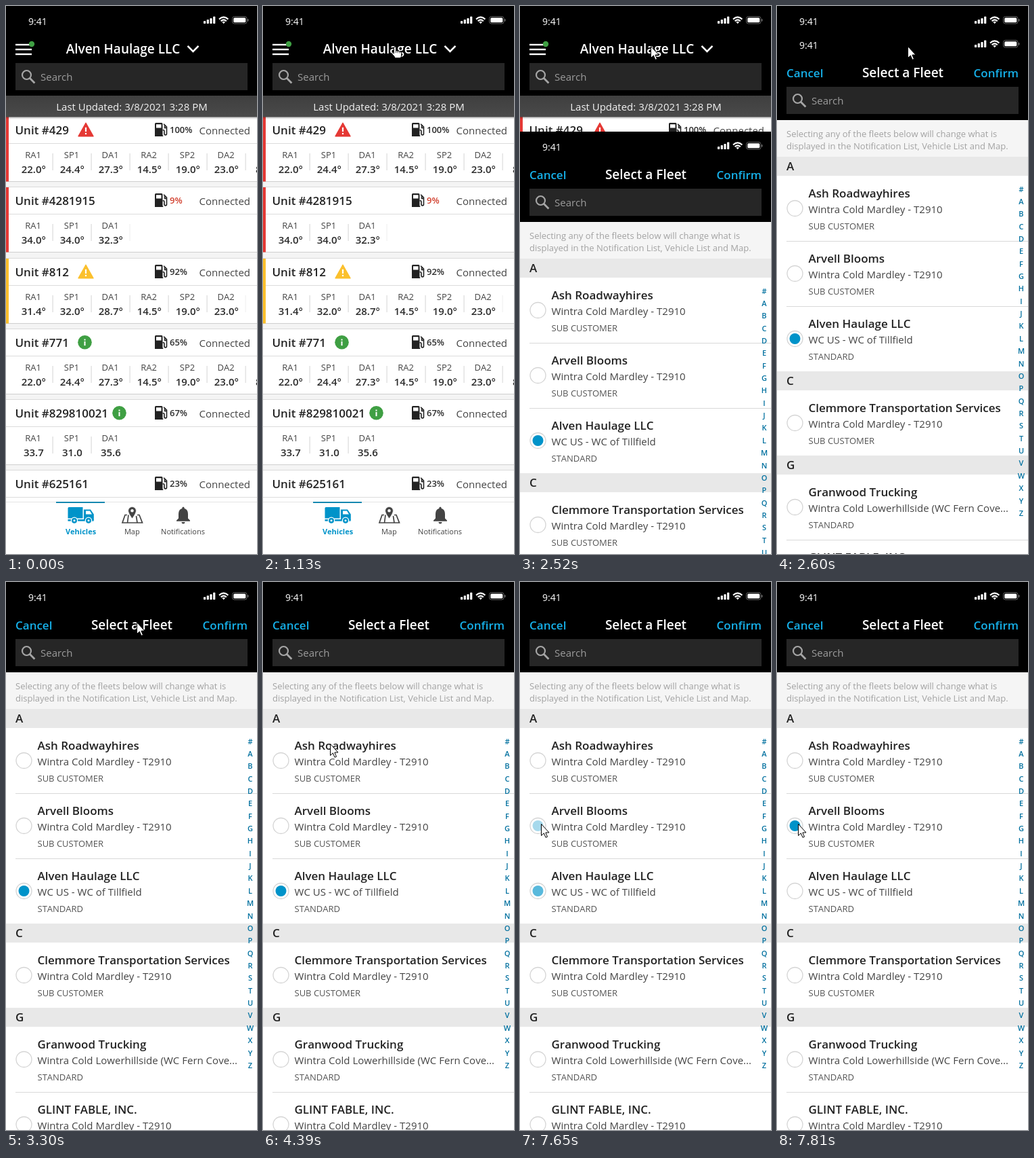
Recreate the animation shown at these times as an HTML page. Size 371x807 px, loop 8000 ms.

```html
<!DOCTYPE html>
<html lang="en">
<head>
<meta charset="utf-8">
<title>Fleet selection</title>
<style>
  html, body { margin: 0; width: 100%; height: 100%; overflow: hidden; background: #fff; }
  svg { display: block; width: 371px; height: 807px; font-family: "Open Sans", sans-serif; font-kerning: none; }
</style>
</head>
<body>
<svg id="stage" viewBox="0 0 371 807" xmlns="http://www.w3.org/2000/svg"></svg>
<script>
const LOOP = 8000;
const BLUE = '#0093c9', LINK = '#16b1ea', RED = '#e53935', AMBER = '#fbc02d', GREEN = '#3f9f43';

const text = (x, y, str, size, fill, weight = 400, anchor = 'start') =>
  `<text x="${x}" y="${y}" font-size="${size}" fill="${fill}" font-weight="${weight}" text-anchor="${anchor}">${str}</text>`;
const rect = (x, y, w, h, fill, rx = 0) =>
  `<rect x="${x}" y="${y}" width="${w}" height="${h}" fill="${fill}" rx="${rx}"/>`;
const path = (d, fill, extra = '') => `<path d="${d}" fill="${fill}" ${extra}/>`;
const line = (d, color, width, extra = '') =>
  path(d, 'none', `stroke="${color}" stroke-width="${width}" ${extra}`);
const circle = (x, y, r, fill, extra = '') =>
  `<circle cx="${x}" cy="${y}" r="${r}" fill="${fill}" ${extra}/>`;
const group = (x, y, body, attrs = '') => `<g transform="translate(${x} ${y})" ${attrs}>${body}</g>`;

// Black header shared by both screens: status icons and search field
function header() {
  const bars = [4, 6, 8, 10.5].map((h, i) => rect(292 + i * 4.7, 26 - h, 3.2, h, '#fff', .8)).join('');
  const wifi = line('M315 19.5Q321.7 13.2 328.4 19.5M317.6 22.2Q321.7 18.4 325.8 22.2', '#fff', 2.1) +
    path('M319.4 23.6Q321.7 21.8 324 23.6L321.7 26.2Z', '#fff');
  const battery = `<rect x="334.5" y="15.5" width="21.5" height="10.5" rx="3" fill="none" stroke="#646464"/>` +
    rect(336.3, 17.2, 18, 7.1, '#fff', 1.6) + rect(357, 19, 1.4, 3.6, '#707070', .7);
  return rect(0, 0, 371, 133, '#000') + text(33, 28, '9:41', 14, '#fff') + bars + wifi + battery +
    rect(14, 84, 343, 40, '#262626') +
    circle(30.5, 101.5, 6.5, 'none', 'stroke="#a6a6a6" stroke-width="2.2"') +
    line('M35.2 106.2L42.4 113.4', '#a6a6a6', 2.8) + text(51, 110, 'Search', 15, '#9c9c9c');
}

const warning = color =>
  path('M0 -10L11 9.5H-11Z', color, `stroke="${color}" stroke-width="1.4" stroke-linejoin="round"`) +
  rect(-1.1, -3.5, 2.2, 6.3, '#fff') + rect(-1.1, 4.6, 2.2, 2.2, '#fff');
const info = circle(0, 0, 10.3, GREEN) + rect(-1, -1.4, 2, 6.2, '#fff') + rect(-1, -4.8, 2, 2, '#fff');
const fuel = path('M1.5 0H10Q11.5 0 11.5 1.5V18.4H12.3V20H0V1.5Q0 0 1.5 0ZM2 2.3V7.6H9.5V2.3Z', '#222', 'fill-rule="evenodd"') +
  line('M11.5 10.8H12.8Q14 10.8 14 12.3V16Q14 17.9 15.8 17.9Q17.5 17.9 17.5 16V6L13.2 1.8M14.6 3.4V7.4H17.5', '#222', 1.6);

const SENSORS = ['RA1', 'SP1', 'DA1', 'RA2', 'SP2', 'DA2', ''];
const LONG = '22.0° 24.4° 27.3° 14.5° 19.0° 23.0° 8.0°';
const UNITS = [
  { id: 429, bar: RED, icon: warning(RED), at: 118, fuel: 100, values: LONG },
  { id: 4281915, bar: RED, fuel: 9, values: '34.0° 34.0° 32.3°', faintEnd: true },
  { id: 812, bar: AMBER, icon: warning(AMBER), at: 118, fuel: 92, values: '31.4° 32.0° 28.7° 14.5° 19.0° 23.0°', faintEnd: true },
  { id: 771, icon: info, at: 116.5, fuel: 65, values: LONG },
  { id: 829810021, icon: info, at: 167.5, fuel: 67, values: '33.7 31.0 35.6' },
  { id: 625161, fuel: 23, values: '' }
];

function unitCard(unit, i) {
  const values = unit.values.split(' ');
  const cells = values.map((value, c) => {
    const x = 40 + c * 57, last = c === values.length - 1;
    const rule = last ? (unit.faintEnd ? '#f1f1f1' : 'none') : '#dcdcdc';
    const label = value ? SENSORS[c] : '';
    return text(x, 224, label, 13, '#444', 400, 'middle') +
      text(x + .8, 246, value, 15, '#2b2b2b', 600, 'middle') + rect(x + 28.5, 217, 1.2, 25, rule);
  }).join('');
  return group(0, Math.round(104.25 * i),
    rect(0, 162.5, 371, 96, '#fff') + rect(0, 162, 371, 1, '#dadada') + rect(0, 258, 371, 1, '#cfcfcf') +
    rect(0, 202, 371, 1, '#dcdcdc') + (unit.bar ? rect(0, 163, 4, 95.5, unit.bar) : '') +
    text(13.5, 189, 'Unit #' + unit.id, 17, '#222', 600) +
    (unit.icon ? group(unit.at, 182.3, unit.icon) : '') + group(220, 172, fuel) +
    text(242, 187, unit.fuel + '%', 13, unit.fuel < 10 ? '#d13f2d' : '#2b2b2b', 600) +
    text(361, 189, 'Connected', 15, '#444', 400, 'end') + cells);
}

function navBar() {
  const truck = path('M93 738H113.5V754.5H91.5V739.5Q91.5 738 93 738ZM115 741.5H125L129.8 748.5V757.5H115Z', BLUE) +
    path('M118 743.5H124L127 748.5H118Z', '#fff') + rect(91.5, 756, 38, 2.6, BLUE) +
    [101, 122].map(x => circle(x, 757.8, 4.6, BLUE, 'stroke="#fff" stroke-width="1.3"') + circle(x, 757.8, 1.5, '#fff')).join('');
  const map = line('M179 749.5H176L172 761H201.5L197 749.5H194M181 749.5L179.5 761M192.5 751L194 761', '#444', 1.7) +
    path('M186.5 737.5C190 737.5 192.4 740 192.4 743.3C192.4 747.5 186.5 754.8 186.5 754.8S180.6 747.5 180.6 743.3C180.6 740 183 737.5 186.5 737.5Z', '#444', 'stroke="#fff" stroke-width=".8"') +
    circle(186.5, 743.2, 2.2, '#fff');
  const bell = path('M262 737.5Q263.8 737.5 263.8 740Q269 741.6 269 748V754.5L272 757.5V758.8H252V757.5L255 754.5V748Q255 741.6 260.2 740Q260.2 737.5 262 737.5ZM259.3 760H264.7Q264.2 762.5 262 762.5T259.3 760Z', '#444');
  return rect(0, 730, 371, 77, '#fff') + rect(0, 730, 371, 1, '#e4e4e4') + rect(74, 730, 72, 2, '#1788b0') +
    truck + map + bell + text(110.5, 778, 'Vehicles', 11, BLUE, 700, 'middle') +
    text(186.3, 778, 'Map', 11, '#444', 400, 'middle') + text(261.5, 778, 'Notifications', 11, '#444', 400, 'middle');
}

function vehicleScreen() {
  const menu = [55.8, 62.8, 69.8].map(y => rect(14, y, 24, 2.4, '#fff')).join('');
  return rect(0, 0, 371, 807, '#f4f4f4') + UNITS.map(unitCard).join('') + rect(0, 163, 371, 4, 'url(#shade)') +
    header() + rect(0, 132, 371, 31.5, 'url(#strip)') +
    text(186, 154, 'Last Updated: 3/8/2021 3:28 PM', 15, '#f2f2f2', 400, 'middle') +
    menu + circle(38, 56, 4.2, GREEN) +
    text(173, 70, 'Alven Haulage LLC', 19, '#fff', 600, 'middle') +
    line('M268.5 58.8L276.5 66.8L284.5 58.8', '#fff', 2.6) + navBar();
}

const DEALER = 'Wintra Cold Mardley - T2910';
const FLEETS = [
  { top: 215, name: 'Ash Roadwayhires', dealer: DEALER, kind: 'SUB CUSTOMER', section: 'A' },
  { top: 311, name: 'Arvell Blooms', dealer: DEALER, kind: 'SUB CUSTOMER', dot: 'newDot' },
  { top: 407, name: 'Alven Haulage LLC', dealer: 'WC US - WC of Tillfield', kind: 'STANDARD', dot: 'oldDot' },
  { top: 531, name: 'Clemmore Transportation Services', dealer: DEALER, kind: 'SUB CUSTOMER', section: 'C' },
  { top: 655, name: 'Granwood Trucking', dealer: 'Wintra Cold Lowerhillside (WC Fern Cove...', kind: 'STANDARD', section: 'G' },
  { top: 751, name: 'GLINT FABLE, INC.', dealer: DEALER, kind: 'SUB CUSTOMER' }
];

// A row opens either with its section heading or with a divider
const fleetRow = f => group(0, f.top,
  (f.section ? rect(0, -28, 371, 28, '#e8e8e8') + text(14, -8, f.section, 17, '#222', 600)
             : rect(14, 0, 357, 1, '#d9d9d9')) +
  text(46.5, 32, f.name, 17, '#222', 600) +
  text(46.5, 55, f.dealer, 15, '#444') + text(46.5, 79, f.kind, 13, '#555') +
  circle(26.5, 48, 11.5, '#fff', 'stroke="#d4d4d4" stroke-width="1.3"') +
  (f.dot ? circle(26.5, 48, 8, BLUE, `id="${f.dot}"`) : ''));

function fleetSheet() {
  const index = [...'#ABCDEFGHIJKLMNOPQRSTUVWXYZ']
    .map((letter, i) => text(361, Math.floor(239 + 18.36 * i), letter, 11, '#00709f', 600, 'middle')).join('');
  return rect(0, 0, 371, 807, '#fff') + header() + rect(0, 133, 371, 54, '#f5f5f5') +
    text(14, 70, 'Cancel', 17, LINK, 600) + text(186, 70, 'Select a Fleet', 19, '#fff', 600, 'middle') +
    text(357, 70, 'Confirm', 17, LINK, 600, 'end') +
    text(14, 158, 'Selecting any of the fleets below will change what is', 13, '#a2a2a2') +
    text(14, 176, 'displayed in the Notification List, Vehicle List and Map.', 13, '#a2a2a2') +
    FLEETS.map(fleetRow).join('') + index;
}

const outline = 'stroke="#000" stroke-width="1" stroke-linejoin="round"';
const arrow = path('M.5 .5V17.5L4.4 13.9L7 20.2L9.5 19.2L6.9 13H12Z', '#fff', outline);
const hand = path('M-1.5 10V1.3Q-1.5 0 0 0T1.5 1.3V6Q3 5 4.2 6.5Q5.8 5.6 7 7.2Q9.8 6.8 9.8 9V12Q9.8 14.2 8.3 16.5H.3Q-1 13.6 -4 11Q-5.4 9.4 -4 8.6Q-2.7 8.2 -1.5 10Z', '#fff', outline) +
  line('M1.5 6V9M4.2 6.5V9.2M7 7.2V9.5', '#000', .8);

const gradient = (id, from, to, startAlpha = 1, endAlpha = 1) =>
  `<linearGradient id="${id}" x2="0" y2="1"><stop stop-color="${from}" stop-opacity="${startAlpha}"/>` +
  `<stop offset="1" stop-color="${to}" stop-opacity="${endAlpha}"/></linearGradient>`;

const stage = document.getElementById('stage');
stage.innerHTML = `<defs>${gradient('strip', '#3f3f3f', '#4a4a4a')}${gradient('shade', '#000', '#000', .28, 0)}</defs>` +
  vehicleScreen() + group(0, 807, fleetSheet(), 'id="sheet"') +
  `<g id="cursor"><g id="arrow">${arrow}</g><g id="hand">${hand}</g></g>`;
const [sheet, cursor, arrowEl, handEl, newDot, oldDot] =
  ['sheet', 'cursor', 'arrow', 'hand', 'newDot', 'oldDot'].map(id => document.getElementById(id));

// Cursor glide: eleven held steps along a quadratic curve
function glide(start, from, bend, to) {
  return Array.from({ length: 11 }, (_, i) => {
    const u = (1 - Math.cos(Math.PI * i / 10)) / 2, v = 1 - u;
    const at = k => v * v * from[k] + 2 * u * v * bend[k] + u * u * to[k];
    return [start + 78 * i, Math.round(at(0)), Math.round(at(1)), 'arrow'];
  });
}

const CURSOR = [
  [0, 0, 0, ''],
  ...glide(280, [347, 719], [339, 367], [197, 65]),
  [1130, 195, 60, 'hand'], [2290, 193, 59, 'arrow'], [3550, 193, 58, 'arrow'],
  ...glide(3860, [191, 61], [125, 190], [45, 338]),
  [4710, 38, 348, 'arrow'], [4790, 36, 355, 'hand'], [4870, 35, 355, 'hand'], [5020, 34, 355, 'hand'],
  [5190, 33, 356, 'hand'], [5360, 32, 356, 'hand'], [7650, 31, 356, 'arrow']
];
const SHEET = [[0, 807], [2290, 775], [2360, 680], [2440, 498], [2520, 185], [2600, 35], [2670, 5], [2750, 0]];
const PICK = [[0, 0], [7650, .35], [7730, .8], [7810, 1]];

const held = (steps, t) => steps.filter(step => step[0] <= t).pop();

const begin = performance.now();
function render() {
  const t = (performance.now() - begin) % LOOP;
  const [, x, y, shape] = held(CURSOR, t);
  cursor.setAttribute('transform', `translate(${x} ${y})`);
  arrowEl.style.display = shape === 'arrow' ? '' : 'none';
  handEl.style.display = shape === 'hand' ? '' : 'none';
  sheet.setAttribute('transform', `translate(0 ${held(SHEET, t)[1]})`);
  const picked = held(PICK, t)[1];
  newDot.style.opacity = picked;
  oldDot.style.opacity = 1 - picked;
  requestAnimationFrame(render);
}
render();
</script>
</body>
</html>
```
